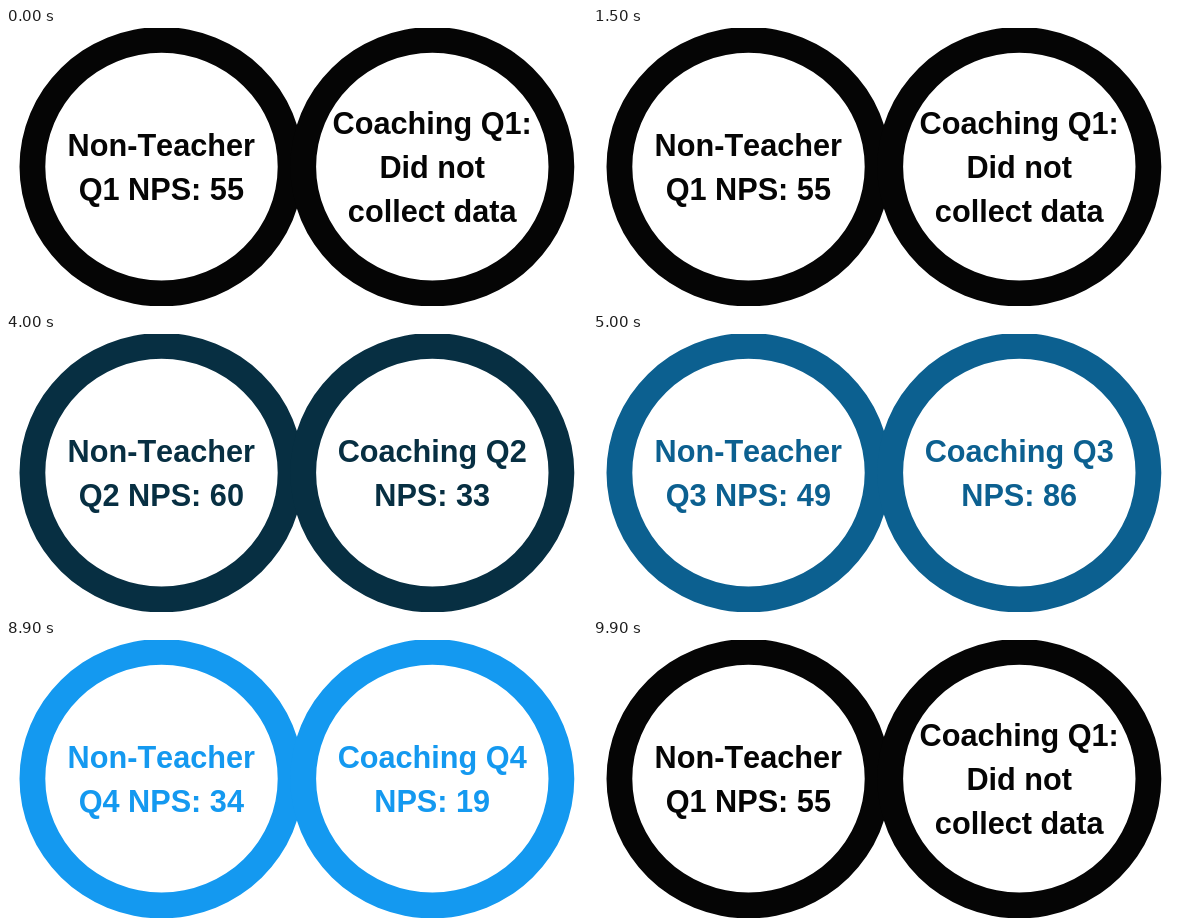
These frames come from a looping animation (581x278 px, 10 s). An HTML page:

```html
<!DOCTYPE html>
<html lang="en">
<head>
<meta charset="utf-8">
<title>Quarterly NPS</title>
<style>
  html, body { margin: 0; width: 100%; height: 100%; overflow: hidden; background: #fff; }
  svg { display: block; width: 581px; height: 278px; }
  text {
    font: bold 30.67px "Liberation Sans", Arial, sans-serif;
    font-kerning: none;
    text-anchor: middle;
    fill: currentColor;
  }
  .ring { fill: currentColor; fill-rule: evenodd; }
  .stage { animation: tint 10s step-end infinite; }
  .q { visibility: hidden; animation: 10s step-end infinite; }
  .q1 { animation-name: q1; }
  .q2 { animation-name: q2; }
  .q3 { animation-name: q3; }
  .q4 { animation-name: q4; }
  @keyframes tint {
    0%, 99%, 100% { color: #050505; }
    25% { color: #072f42; }
    50% { color: #0c6090; }
    74% { color: #1499f0; }
  }
  @keyframes q1 { 0%, 99%, 100% { visibility: visible; } 25% { visibility: hidden; } }
  @keyframes q2 { 0%, 50%, 100% { visibility: hidden; } 25% { visibility: visible; } }
  @keyframes q3 { 0%, 74%, 100% { visibility: hidden; } 50% { visibility: visible; } }
  @keyframes q4 { 0%, 99%, 100% { visibility: hidden; } 74% { visibility: visible; } }
</style>
</head>
<body>
<svg class="stage" viewBox="0 0 581 278">
  <defs>
    <path id="ring" class="ring" d="M-142 0a142 139.7 0 1 0 284 0a142 139.7 0 1 0-284 0zM-116.2 0a116.2 113.8 0 1 0 232.4 0a116.2 113.8 0 1 0-232.4 0z"/>
  </defs>
  <use href="#ring" x="155.5" y="138.7"/>
  <use href="#ring" x="426.3" y="138.7"/>
  <text x="155.3" y="128">Non-Teacher</text>
  <g class="q q1">
    <text x="155.3" y="172">Q1 NPS: 55</text>
    <text x="426.2" y="106">Coaching Q1:</text>
    <text x="426.2" y="150">Did not</text>
    <text x="426.2" y="194">collect data</text>
  </g>
  <g class="q q2">
    <text x="155.3" y="172">Q2 NPS: 60</text>
    <text x="426.2" y="128">Coaching Q2</text>
    <text x="426.2" y="172">NPS: 33</text>
  </g>
  <g class="q q3">
    <text x="155.3" y="172">Q3 NPS: 49</text>
    <text x="426.2" y="128">Coaching Q3</text>
    <text x="426.2" y="172">NPS: 86</text>
  </g>
  <g class="q q4">
    <text x="155.3" y="172">Q4 NPS: 34</text>
    <text x="426.2" y="128">Coaching Q4</text>
    <text x="426.2" y="172">NPS: 19</text>
  </g>
</svg>
</body>
</html>
```
